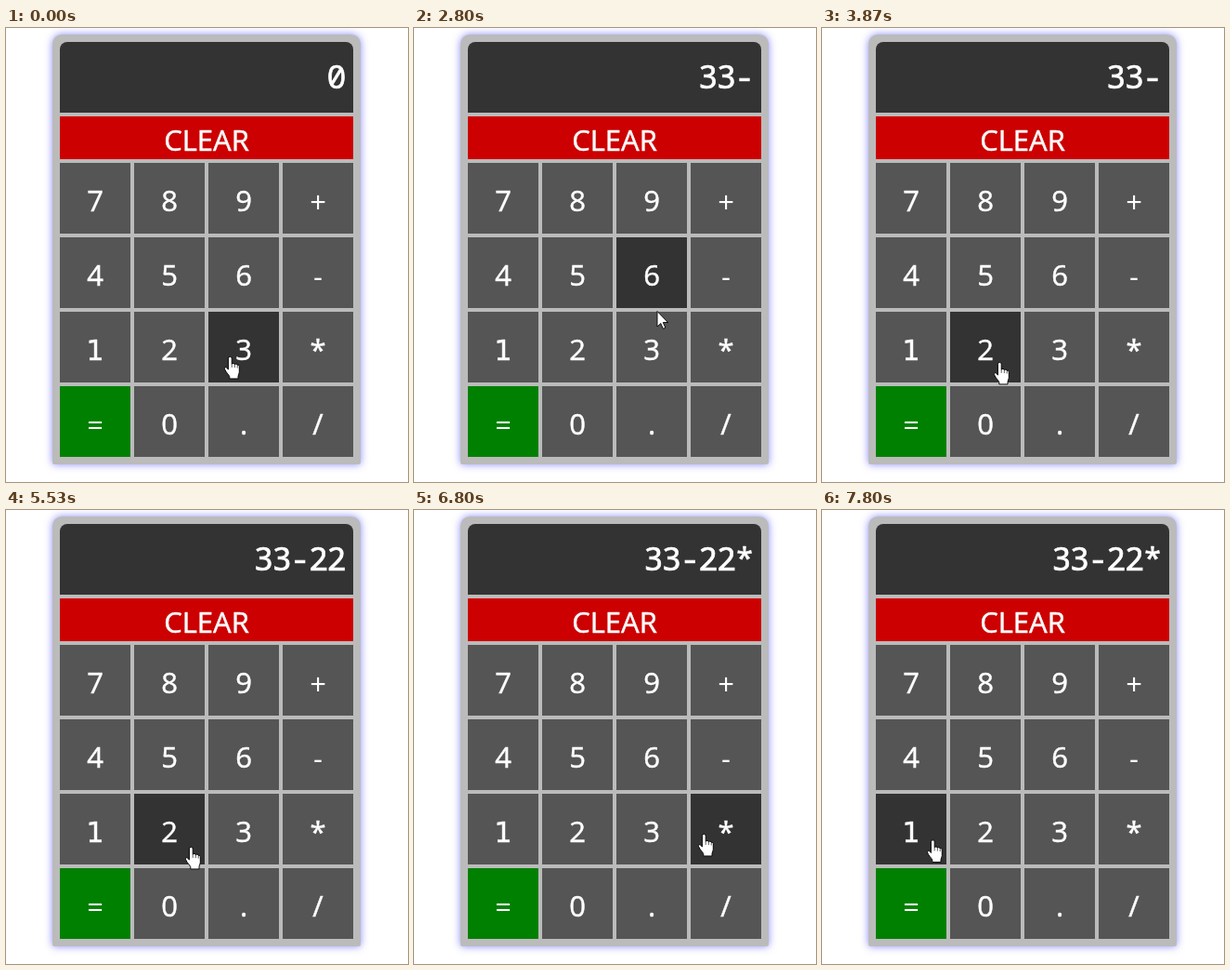
Animation, 433 px wide and 488 px high, one loop 8 s. Source, as an HTML page:

```html
<!DOCTYPE html>
<html lang="en">
<head>
<meta charset="utf-8">
<title>Calculator</title>
<style>
  html, body { margin: 0; width: 100%; height: 100%; overflow: hidden; background: #fff; }
  .case {
    position: absolute; left: 50px; top: 7px; width: 332px; height: 462px;
    background: #bbb; border-radius: 10px 10px 2px 2px;
    box-shadow: 0 0 8px rgba(40, 40, 255, .55);
  }
  svg { position: absolute; left: 0; top: 0; }
  text { fill: #fff; text-anchor: middle; }
  .label { font: 31px "Open Sans", "Noto Sans", sans-serif; stroke: #fff; stroke-width: .5; }
  .footed { font-family: "DejaVu Sans", sans-serif; font-size: 30px; }
  .sign { stroke: none; }
  .readout { font: condensed 35px "Noto Sans Mono", monospace; stroke: #fff; stroke-width: .7; }
  .cursor { fill: #fff; stroke: #000; stroke-width: .9; stroke-linejoin: round; }
</style>
</head>
<body>
<div class="case"></div>
<svg width="433" height="488" viewBox="0 0 433 488">
  <path d="M58 91V23a8 8 0 0 1 8-8H366a8 8 0 0 1 8 8V91Z" fill="#333"/>
  <text id="readout" class="readout" y="65"></text>
  <rect x="58" y="95" width="316" height="46" fill="#c00"/>
  <text class="label" x="216" y="131.5">CLEAR</text>
  <g id="keys"></g>
  <g id="hand" class="cursor">
    <g transform="translate(-.5 -.7) scale(1.05)">
      <path d="M-1.5 13.5V2.3a1.75 1.75 0 0 1 3.6 0V8a1.6 1.4 0 0 1 3 .5a1.5 1.4 0 0 1 2.7 .7a1.3 1.4 0 0 1 2 1.3V16.5c0 1.5-1.2 2.5-1.2 4V23H-.2V20.8C-1.2 18.5-4 16.5-5.2 13.2c-.6-1.6 1-2.4 2-1.4Z"/>
      <path d="M2.1 8v3.5M5.1 8.7v3M7.8 9.6v2.5" stroke-width=".6"/>
    </g>
  </g>
  <path id="arrow" class="cursor" d="M0 0V16.5L3.8 13L6.3 18.8L8.8 17.7L6.3 12H11.6Z"/>
</svg>
<script>
const DURATION = 8000, FRAME = 1000 / 15;
const LEFT = 58, TOP = 145, PITCH = 80, SIZE = 76;
const LABELS = "789+456-123*=0./";

// [time, character]
const PRESSES = [[730, "3"], [1400, "3"], [2470, "-"], [4670, "2"], [5530, "2"], [6800, "*"]];

// Pointer strokes: [first step, last step, x, y reached]
const HOME = [241.5, 353.5];
const MOVES = [
  [270, 400, 231, 357],
  [1870, 2200, 314, 277],
  [2670, 2800, 262, 304.5],
  [2870, 3130, 206, 364.5],
  [3330, 3400, 210.5, 366.5],
  [3470, 3600, 221, 364],
  [3670, 3870, 191.5, 359.5],
  [4200, 4330, 199.5, 362.5],
  [5930, 6330, 312.5, 348.5],
  [7130, 7800, 119.5, 355]
];

const byId = id => document.getElementById(id);
const readout = byId("readout"), hand = byId("hand"), arrow = byId("arrow");

function add(tag, attributes) {
  const node = document.createElementNS("http://www.w3.org/2000/svg", tag);
  for (const name in attributes) node.setAttribute(name, attributes[name]);
  return byId("keys").appendChild(node);
}

function labelClass(label) {
  if (label === "1") return "label footed";
  return "+-=".includes(label) ? "label sign" : "label";
}

const keys = [...LABELS].map((label, i) => {
  const x = LEFT + i % 4 * PITCH, y = TOP + Math.floor(i / 4) * PITCH;
  const key = add("rect", { x, y, width: SIZE, height: SIZE });
  const style = labelClass(label);
  const baseline = y + (style.includes("sign") ? 53 : 51.5);
  add("text", { x: x + SIZE / 2, y: baseline, class: style }).textContent = label;
  return key;
});

// Each character is centred in its own cell, counted from the right.
function showReadout(text) {
  if (readout.textContent === text) return;
  readout.setAttribute("x", [...text].map((_, i) => 356 - 19.6 * (text.length - 1 - i)).join(" "));
  readout.textContent = text;
}

const frameAt = time => Math.floor((time + 5) / FRAME);
const easeInOut = p => p < .5 ? 4 * p ** 3 : 1 - 4 * (1 - p) ** 3;

function pointerAt(time) {
  let [x, y] = HOME;
  for (const [start, end, toX, toY] of MOVES) {
    if (time < start) break;
    const first = frameAt(start) - 1;
    const p = easeInOut(Math.min(1, (frameAt(time) - first) / (frameAt(end) - first)));
    x += (toX - x) * p;
    y += (toY - y) * p;
  }
  return [x, y];
}

function render(time) {
  const typed = PRESSES.filter(([at]) => at <= time).map(([, character]) => character);
  showReadout(typed.join("") || "0");

  const [x, y] = pointerAt(time);
  const dx = x - LEFT, dy = y - TOP;
  const hovered = Math.floor(dy / PITCH) * 4 + Math.floor(dx / PITCH);
  const inGap = dx % PITCH >= SIZE || dy % PITCH >= SIZE;

  keys.forEach((key, i) => {
    const base = LABELS[i] === "=" ? "#008000" : "#555";
    key.setAttribute("fill", i === hovered ? "#333" : base);
  });
  for (const cursor of [hand, arrow]) {
    cursor.setAttribute("transform", `translate(${x} ${y})`);
    cursor.setAttribute("visibility", (cursor === arrow) === inGap ? "visible" : "hidden");
  }
}

const start = performance.now();
function tick() {
  render((performance.now() - start) % DURATION);
  requestAnimationFrame(tick);
}
tick();
</script>
</body>
</html>
```
